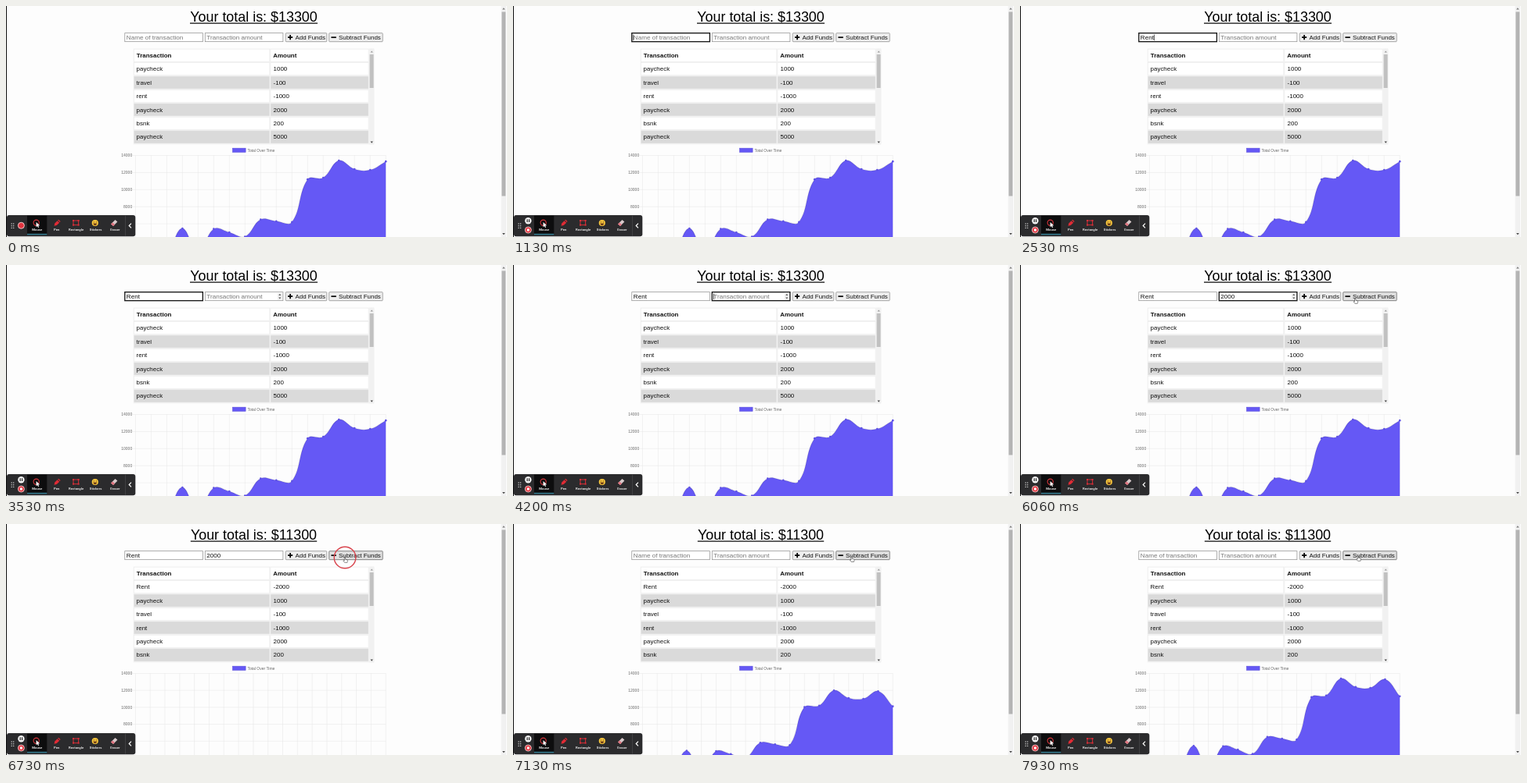
Animation of 640x296 px, one loop 8000 ms. Source, as an HTML page:

```html
<!DOCTYPE html>
<html lang="en">
<head>
<meta charset="utf-8">
<title>Budget tracker</title>
<style>
html, body { margin: 0; width: 100%; height: 100%; overflow: hidden; background: #fdfdfd; }
svg { display: block; width: 640px; height: 296px; }
text { font-family: "Liberation Sans", Arial, sans-serif; font-size: 7.95px; fill: #111; white-space: pre; }
.title { font-size: 17.9px; text-anchor: middle; fill: #000; }
.bold { font-weight: 700; }
.tiny { font-size: 5px; fill: #666; }
.tick { text-anchor: end; }
.tool { font: 500 4.3px Roboto, sans-serif; fill: #fff; text-anchor: middle; }
.field text { font-size: 8.1px; }
</style>
</head>
<body>
<svg id="stage" viewBox="0 0 640 296" xmlns="http://www.w3.org/2000/svg"></svg>
<script>
const LOOP = 8000;
const CLICK_NAME = 850, CLICK_AMOUNT = 3900, SUBMIT = 6670, CLEAR = 7030;
const NAME_KEYS = [1980, 2150, 2330, 2500];
const AMOUNT_KEYS = [4600, 4800, 5100, 5250];
const BLINK = 530;
const PURPLE = '#6558f5';

const stage = document.getElementById('stage');

function add(tag, attrs = {}, parent = stage, text = '') {
  const node = document.createElementNS('http://www.w3.org/2000/svg', tag);
  for (const key in attrs) node.setAttribute(key, attrs[key]);
  node.textContent = text;
  parent.appendChild(node);
  return node;
}
const set = (node, attrs) => { for (const key in attrs) node.setAttribute(key, attrs[key]); };
const show = (node, on) => { node.style.display = on ? '' : 'none'; };
const rect = (x, y, width, height, fill, more = {}, parent = stage) =>
  add('rect', { x, y, width, height, fill, ...more }, parent);
const label = (x, y, text, cls = '', parent = stage) => add('text', { x, y, class: cls }, parent, text);
const path = (d, attrs, parent = stage) => add('path', { d, fill: 'none', ...attrs }, parent);
const circle = (cx, cy, r, attrs, parent = stage) => add('circle', { cx, cy, r, ...attrs }, parent);

// Page frame and heading
rect(0, 0, 640, 296, '#fdfdfd');
rect(0, 0, 1, 296, '#111');
rect(632.5, 0, 6.5, 296, '#f1f1f1');
rect(633.3, 7.5, 4.9, 236, '#b4b4b4');
path('M634 4.5L635.8 2.2L637.6 4.5Z', { fill: '#777' });
path('M634 291L635.8 293.3L637.6 291Z', { fill: '#444' });
const title = label(316.5, 20, '', 'title');
const underline = rect(235, 21.5, 163, 1.2, '#000');

// Form
function makeField(x, placeholder, hasSpinner) {
  const g = add('g', { class: 'field' });
  const box = rect(x, 34.7, 99.6, 11, '#fff', {}, g);
  const text = label(x + 2, 43, '', '', g);
  const caret = rect(0, 36.6, 0.7, 7.6, '#000', {}, g);
  const spinner = add('g', { fill: '#555' }, g);
  if (hasSpinner) {
    rect(x + 92.5, 35.8, 6, 8.8, '#efefef', {}, spinner);
    path(`M${x + 93.9} 39L${x + 95.5} 37L${x + 97.1} 39ZM${x + 93.9} 41.4L${x + 95.5} 43.4L${x + 97.1} 41.4Z`,
      { fill: '#555' }, spinner);
  }
  return (value, focused, caretOn, spinnerOn) => {
    set(box, { stroke: focused ? '#101010' : '#8a8a8a', 'stroke-width': focused ? 1.3 : 0.7 });
    text.textContent = value || placeholder;
    text.style.fill = value ? '#111' : '#777';
    show(caret, focused && caretOn);
    if (focused) caret.setAttribute('x', x + 2 + (value ? text.getComputedTextLength() : -0.3));
    show(spinner, spinnerOn);
  };
}
function makeButton(x, width, text, icon) {
  const box = rect(x, 34.7, width, 11, '#efefef', { stroke: '#858585', 'stroke-width': 0.7, rx: 0.8 });
  path(icon, { stroke: '#000', 'stroke-width': 1.7 });
  label(x + 12.3, 43, text);
  return hovered => set(box, { fill: hovered ? '#e0e0e0' : '#efefef', stroke: hovered ? '#555' : '#858585' });
}
const nameField = makeField(151.8, 'Name of transaction', false);
const amountField = makeField(254.3, 'Transaction amount', true);
const addButton = makeButton(357.2, 52.6, 'Add Funds', 'M360 40.2H366.2M363.1 37.1V43.3');
const subtractButton = makeButton(412.7, 68.5, 'Subtract Funds', 'M415.4 40.2H421.8');

// Transaction table
rect(162.7, 54.5, 307.6, 123, '#f4f4f4');
const rowTop = i => 55 + i * 17.43;
for (let i = 0; i < 7; i++) {
  const fill = i && i % 2 === 0 ? '#dadada' : '#fff';
  const height = i === 6 ? 16.2 : 16;
  rect(163.4, rowTop(i) + 0.2, 173.4, height, fill, { stroke: '#e9e9e9', 'stroke-width': 0.5 });
  rect(338, rowTop(i) + 0.2, 125, height, fill, { stroke: '#e9e9e9', 'stroke-width': 0.5 });
}
label(166.8, 65.8, 'Transaction', 'bold');
label(341.3, 65.8, 'Amount', 'bold');
const rows = Array.from({ length: 6 }, (_, i) => {
  const y = rowTop(i + 1) + 10.9;
  return [label(166.6, y, ''), label(341.6, y, '')];
});
rect(463.9, 54.6, 6.4, 122.8, '#f1f1f1');
rect(464.6, 62, 5, 43, '#c1c1c1');
path('M465.5 59.5L467.2 57.4L468.9 59.5Z', { fill: '#999' });
path('M465.5 173.6L467.2 175.7L468.9 173.6Z', { fill: '#444' });

const history = [['Rent', -2000], ['paycheck', 1000], ['travel', -100], ['rent', -1000],
  ['paycheck', 2000], ['bsnk', 200], ['paycheck', 5000]];

// Chart
const LEFT = 165.4, TOP = 191.5, WIDTH = 319.8;
const totals = [1000, 1600, 2600, 5450, 2600, 5400, 5000, 4500, 6500, 6300, 6200,
  11200, 11400, 13400, 12400, 12300, 13300, 11300];
rect(289.5, 182.2, 16.6, 5.1, PURPLE, { stroke: '#5b4fdc', 'stroke-width': 0.6 });
label(308.4, 186.5, 'Total Over Time', 'tiny');

function makeChart(values, step) {
  const g = add('g');
  const base = TOP + 7 * step;
  const gap = WIDTH / (values.length - 1);
  let grid = '';
  for (let i = 0; i < 5; i++) {
    const y = TOP + i * step;
    grid += `M${LEFT - 4} ${y}H${LEFT + WIDTH}`;
    label(LEFT - 4.2, y + 1.7, 14000 - 2000 * i, 'tiny tick', g);
  }
  values.forEach((_, i) => { grid += `M${LEFT + i * gap} ${TOP}V296`; });
  path(grid, { stroke: '#e4e4e4', 'stroke-width': 0.5 }, g);
  const area = path('', { fill: PURPLE }, g);
  const line = path('', { stroke: '#000', 'stroke-opacity': 0.1, 'stroke-width': 1.2 }, g);
  const points = values.map((v, i) => ({ x: LEFT + i * gap, y: base - v * step / 2000 }));
  const dots = points.map(p => circle(p.x, p.y, 1.3, { fill: '#5d50e6' }, g));

  // Tension spline: handles follow the chord between the neighbours
  const handles = points.map((p, i) => {
    const a = points[i - 1] || p, b = points[i + 1] || p;
    const before = Math.hypot(p.x - a.x, p.y - a.y), after = Math.hypot(b.x - p.x, b.y - p.y);
    const k = 0.4 / (before + after);
    const shift = f => ({ x: p.x + f * (b.x - a.x), y: p.y + f * (b.y - a.y) });
    return { into: shift(-k * before), out: shift(k * after) };
  });
  return (visible, grow) => {
    show(g, visible);
    if (!visible) return;
    const at = p => `${p.x.toFixed(2)} ${(base + (p.y - base) * grow).toFixed(2)}`;
    let d = `M${at(points[0])}`;
    for (let i = 1; i < points.length; i++) {
      d += `C${at(handles[i - 1].out)} ${at(handles[i].into)} ${at(points[i])}`;
    }
    line.setAttribute('d', d);
    area.setAttribute('d', `${d}V${base}H${LEFT}Z`);
    dots.forEach((dot, i) => dot.setAttribute('cy', base + (points[i].y - base) * grow));
  };
}
const oldChart = makeChart(totals.slice(0, -1), 21.9);
const newChart = makeChart(totals, 21.7);

// Recorder toolbar
rect(1, 268, 164.3, 27.3, '#2b2b2d', { rx: 3 });
rect(27, 268.6, 25.3, 24.6, '#0d0d0e');
rect(27, 291.8, 25.3, 1.5, '#347d92');
rect(152.2, 268.6, 0.7, 26, '#4a4a4c');
for (let i = 0; i < 6; i++) circle(7.2 + (i % 2) * 2.5, 279 + (i >> 1) * 2.7, 0.7, { fill: '#ddd' });
const startControl = add('g');
circle(19.4, 281.3, 4, { fill: '#e2343f', stroke: '#f5dcdc', 'stroke-width': 0.9 }, startControl);
const liveControls = add('g');
circle(19.4, 275.2, 4.2, { fill: '#f4f4f4' }, liveControls);
path('M18.2 273.3V277.1M20.6 273.3V277.1', { stroke: '#222', 'stroke-width': 1.2 }, liveControls);
circle(19.4, 287, 4, { fill: '#e2343f', stroke: '#f5dcdc', 'stroke-width': 0.8 }, liveControls);
rect(17.9, 285.5, 3, 3, '#fff', {}, liveControls);

circle(38.7, 277.7, 3.6, { fill: 'none', stroke: '#d9363c', 'stroke-width': 1.1 });
path('M38.6 277L43.2 281.2L41.1 281.4L42.2 283.4L41.1 283.9L40.1 281.9L38.6 283.2Z', { fill: '#fff' });
path('M61.5 281.8L62.3 278.6L65.6 275.2L68.2 277.7L64.8 281Z', { fill: '#e02b35' });
path('M66.2 274.6L67.2 273.7L69.6 276.1L68.7 277.1Z', { fill: '#e02b35' });
rect(86, 275, 6.6, 5.6, 'none', { stroke: '#d62f38', 'stroke-width': 1 });
for (const x of [86, 92.6]) for (const y of [275, 280.6]) rect(x - 1, y - 1, 2, 2, '#d62f38');
circle(113.8, 278, 4.1, { fill: '#f8c73d' });
path('M111.3 278.6H116.3Q115.8 281.2 113.8 281.2Q111.8 281.2 111.3 278.6Z', { fill: '#6b3a18' });
circle(112.3, 276.8, 0.6, { fill: '#4c2d12' });
circle(115.3, 276.8, 0.6, { fill: '#4c2d12' });
path('M134 279.5L139.4 274L142.4 276.6L137 282Z', { fill: '#d8c9ca' });
path('M134 279.5L136 277.4L139 280L137 282Z', { fill: '#e0717c' });
[['Mouse', 39.8], ['Pen', 64.7], ['Rectangle', 89.6], ['Stickers', 114.6], ['Eraser', 139.4]]
  .forEach(([text, x]) => label(x, 288.3, text, 'tool'));
path('M160 278.6L157.2 281.5L160 284.4', { stroke: '#fff', 'stroke-width': 1.2 });

// Pointer
const ring = circle(0, 0, 13.8, { fill: 'none', stroke: '#d8434c', 'stroke-width': 1.4 });
const outline = { fill: '#fff', stroke: '#222', 'stroke-width': 0.5 };
const arrow = path('M0 0V7L1.7 5.5L2.9 8L4 7.5L2.9 5.1H5Z', outline);
const hand = path('M-.7 0Q0 -.7 .6 0V2.4L3 3Q3.6 3.3 3.4 4.3L2.9 6.4H-.4L-2.2 4Q-2 3.1 -.7 4Z', outline);

const between = (t, a, b) => t >= a && t < b;
const ease = p => p * p * (3 - 2 * p);
const typed = (text, keys, t) => text.slice(0, keys.filter(k => t >= k).length);
const stops = [
  [250, 508, 150], [780, 200, 42], [2800, 200, 42], [3450, 310, 42],
  [5400, 310, 42], [6150, 433, 43], [6900, 433, 43], [7400, 432, 41]
];

function pointer(t) {
  const next = stops.findIndex(s => s[0] > t);
  if (next <= 0) return next ? stops[stops.length - 1].slice(1) : stops[0].slice(1);
  const [t0, x0, y0] = stops[next - 1], [t1, x1, y1] = stops[next];
  const p = ease((t - t0) / (t1 - t0));
  return [x0 + (x1 - x0) * p, y0 + (y1 - y0) * p];
}

function render(t) {
  const done = t >= SUBMIT;
  title.textContent = `Your total is: $${done ? 11300 : 13300}`;
  set(underline, done ? { x: 235.8, width: 161.4 } : { x: 235, width: 163 });
  rows.forEach(([name, amount], i) => {
    [name.textContent, amount.textContent] = history[i + (done ? 0 : 1)];
  });

  const [x, y] = pointer(t);
  const over = (left, right) => y > 34 && y < 46 && x >= left && x <= right;
  const overAdd = over(357, 410), overSubtract = over(412, 481);
  const nameFocus = between(t, CLICK_NAME, CLICK_AMOUNT);
  const amountFocus = between(t, CLICK_AMOUNT, SUBMIT - 100);
  const lastKey = Math.max(...[CLICK_NAME, CLICK_AMOUNT, ...NAME_KEYS, ...AMOUNT_KEYS].filter(k => k <= t));
  const caretOn = Math.floor((t - lastKey) / BLINK) % 2 === 0;
  const cleared = t >= CLEAR;
  nameField(cleared ? '' : typed('Rent', NAME_KEYS, t), nameFocus, caretOn, false);
  amountField(cleared ? '' : typed('2000', AMOUNT_KEYS, t), amountFocus, caretOn,
    amountFocus || over(254, 354));
  addButton(overAdd);
  subtractButton(overSubtract);

  const progress = Math.min(1, Math.max(0, (t - SUBMIT - 30) / 1000));
  oldChart(!done, 1);
  newChart(done, 1 - (1 - progress) ** 4);

  show(startControl, t < 400);
  show(liveControls, t >= 400);
  show(arrow, between(t, 250, 770) && y > 46);
  show(hand, overAdd || overSubtract);
  for (const node of [arrow, hand]) node.setAttribute('transform', `translate(${x} ${y})`);
  show(ring, [CLICK_NAME, CLICK_AMOUNT, SUBMIT - 100].some(c => between(t, c - 20, c + 240)));
  set(ring, { cx: x, cy: y });
}

const start = performance.now();
function tick() {
  render((performance.now() - start) % LOOP);
  requestAnimationFrame(tick);
}
tick();
</script>
</body>
</html>
```
